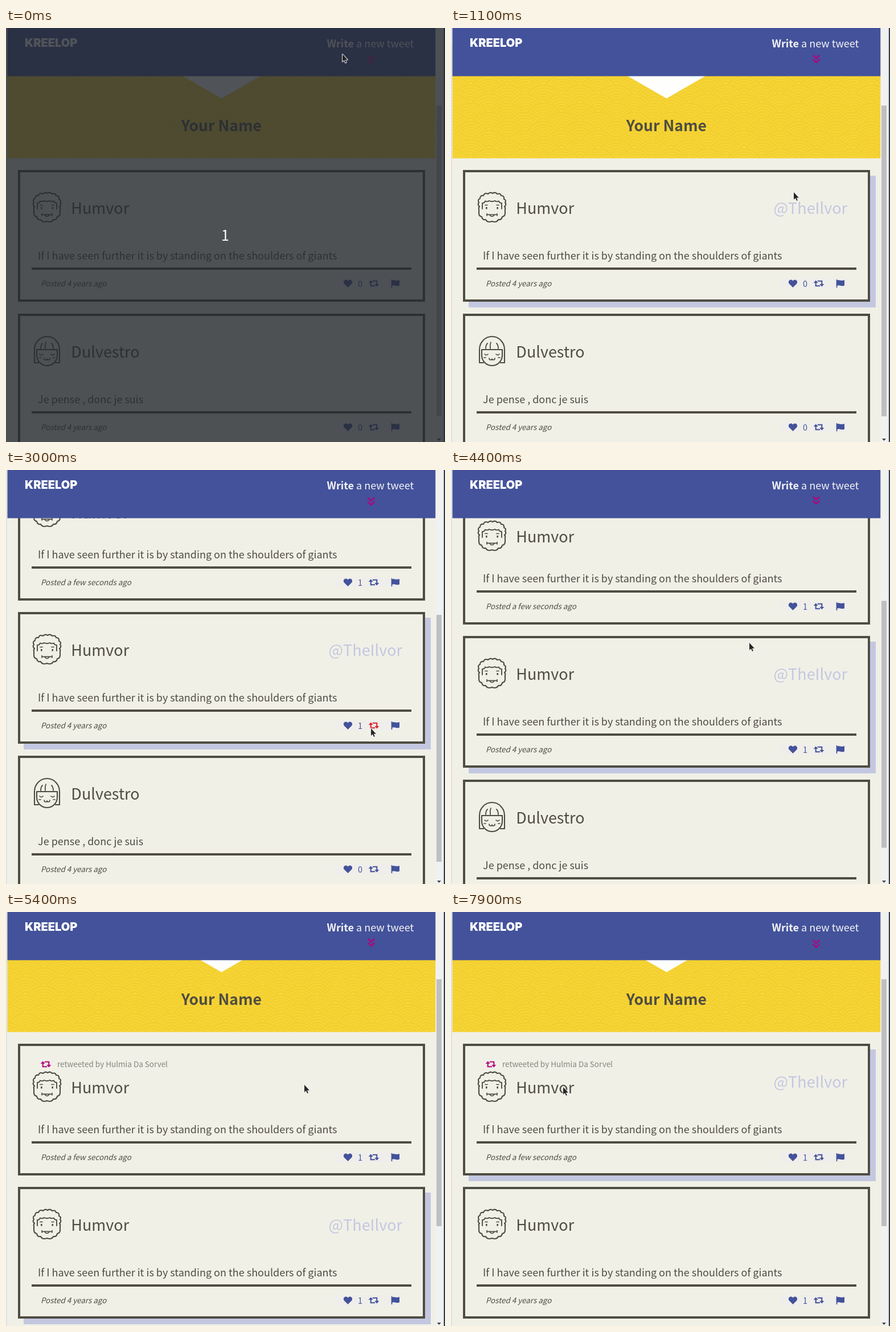
Animation of 771 by 726 pixels, one loop 8 s. Source, as an HTML page with a canvas:

```html
<!DOCTYPE html>
<html lang="en">
<head>
<meta charset="utf-8">
<style>
html, body { margin: 0; width: 771px; height: 726px; overflow: hidden; background: #f1f0e7; }
canvas { display: block; }
</style>
</head>
<body>
<canvas id="stage" width="771" height="726"></canvas>
<script>
const ctx = document.getElementById('stage').getContext('2d');
const LOOP = 8000, STEP = 100;
const INK = '#4f4d42', BLUE = '#43529a', PAPER = '#f1f0e7', LILAC = '#c3c7e0', PINK = '#b1087f';
const SANS = '"Noto Sans CJK JP", "Noto Sans CJK SC", "Noto Sans CJK", "Noto Sans", sans-serif';
const QUOTE = 'If I have seen further it is by standing on the shoulders of giants';

// Keyframes: [time, values...]
const POINTER = [
  [0, 591, 46], [200, 591, 47], [500, 587, 180], [900, 587, 272], [1100, 602, 288],
  [1500, 622, 350], [1800, 635, 408], [1900, 639, 444], [2300, 641, 453], [3300, 641, 453],
  [3700, 590, 385], [4200, 524, 303], [5400, 524, 303], [5800, 440, 287], [6300, 330, 275],
  [6900, 215, 268], [7200, 188, 280], [7500, 177, 293], [7900, 197, 307]
];
const SCROLL = [[4300, 0], [4400, 42], [4500, 92], [4800, 181], [5000, 218], [5200, 233]];

function track(keys, t) {
  if (t <= keys[0][0]) return keys[0].slice(1);
  for (let i = 1; i < keys.length; i++) {
    const a = keys[i - 1], b = keys[i];
    if (t <= b[0]) {
      const k = (t - a[0]) / (b[0] - a[0]);
      return a.slice(1).map((v, j) => v + (b[j + 1] - v) * k);
    }
  }
  return keys[keys.length - 1].slice(1);
}

function box(x, y, w, h, color) {
  ctx.fillStyle = color;
  ctx.fillRect(x, y, w, h);
}

function text(str, x, y, size, color, style = '', align = 'left') {
  ctx.font = `${style} ${size}px ${SANS}`;
  ctx.fillStyle = color;
  ctx.textAlign = align;
  ctx.fillText(str, x, y);
  return ctx.measureText(str).width;
}

function at(x, y, draw) {
  ctx.save();
  ctx.translate(x, y);
  draw();
  ctx.restore();
}

const fill = (d, color) => { ctx.fillStyle = color; ctx.fill(new Path2D(d)); };
function line(d, color, width) {
  ctx.strokeStyle = color;
  ctx.lineWidth = width;
  ctx.stroke(new Path2D(d));
}

// Overlapping fans of concentric arcs
function makeWaves() {
  const tile = document.createElement('canvas');
  const w = tile.width = 64, h = tile.height = 32;
  const g = tile.getContext('2d');
  for (let row = -1; row < 6; row++) {
    for (let col = -1; col < 3; col++) {
      const x = col * w + (row & 1 ? w / 2 : 0), y = row * h / 2 + 16;
      for (let r = 32; r > 3; r -= 5) {
        g.beginPath();
        g.arc(x, y, r, 0, Math.PI * 2);
        g.fillStyle = '#f7d535';
        g.fill();
        g.strokeStyle = '#efcc30';
        g.lineWidth = 1.3;
        g.stroke();
      }
    }
  }
  return ctx.createPattern(tile, 'repeat');
}
const waves = makeWaves();

function curlyFace() {
  line('M4 25 Q0 22 3 18 Q0 13 5 11 Q5 5 11 6 Q13 0 19 3 Q23 -1 27 2 Q32 -1 35 3 Q41 1 42 6 Q48 6 47 12 Q52 14 49 18 Q52 22 48 25', INK, 2.1);
  line('M4 25 Q2 27 3 30 V37 Q3 42 8 43 Q9 49 15 48 Q18 54 26 51 Q34 54 37 48 Q43 49 44 43 Q49 42 49 37 V30 Q50 27 48 25', INK, 2.1);
  line('M9 29 V19 Q13 19 14 15.5 Q18 17.5 21 15 Q26 17.5 31 15 Q34 17.5 38 15.5 Q39 19 43 19 V29', INK, 1.9);
  line('M14 22.5 H18 M34 22.5 H38 M17 37.5 V41 M35 37.5 V41 M17 39.3 H35 M22 40 Q26 45 30 40', INK, 1.7);
  fill('M15 26 h2.6 v3.6 h-2.6 z M34.4 26 h2.6 v3.6 h-2.6 z', INK);
}

function bobFace() {
  line('M4 47 V24 A22 23 0 0 1 48 24 V47 H41 M4 47 H11', INK, 2.1);
  line('M8 24 V34 A18 18 0 0 0 44 34 V24 Z', INK, 2.1);
  line('M15 22 Q15 16 18 13 M23 22 Q22 16 24 11 M37 22 Q37 16 34 13', INK, 1.8);
  line('M13 32 Q16 35 19 32 M33 32 Q36 35 39 32 M12 38 H15 M37 38 H40 M21 39 Q21 42 23.5 42 Q26 42 26 40 Q26 42 28.5 42 Q31 42 31 39', INK, 1.7);
}

function repost(x, y, color) {
  at(x, y, () => {
    ctx.lineCap = 'butt';
    ctx.lineJoin = 'miter';
    line('M-5.3 -2 V4.3 H2.2 M-2.2 -4.3 H5.3 V2', color, 2.1);
    fill('M-9.3 -1 L-5.3 -5.6 L-1.3 -1 Z M9.3 1 L5.3 5.6 L1.3 1 Z', color);
  });
}

function actions(y, likes, hot) {
  box(577, y - 9, 118, 18, '#efeeea');
  at(600.5, y, () => fill('M0 7 L-6.6 .4 C-10 -4 -4 -9.5 0 -4.5 C4 -9.5 10 -4 6.6 .4 Z', BLUE));
  text(likes, 618, y + 5.6, 14.4, BLUE);
  repost(646, y, hot ? '#dc242c' : BLUE);
  at(684, y, () => {
    fill('M-6 -5.5 C-2 -7.5 0 -3.5 7 -6 V3.5 C1 6 -1 1.8 -6 3.8 Z', BLUE);
    line('M-6.5 -6.3 V6.5', BLUE, 1.7);
  });
}

function card(y, o) {
  const top = Math.round(y);
  if (o.hover) box(31, top + 10, 715, 231, LILAC);
  box(21, top, 715, 231, INK);
  box(25, top + 4, 707, 223, PAPER);
  const drop = o.shared ? 10 : 0;
  if (o.shared) {
    repost(70, top + 36, PINK);
    text('retweeted by Hulmia Da Sorvel', 90, top + 41, 13.5, '#85847e');
  }
  at(46, top + 39 + drop, o.face);
  text(o.name, 114.3, top + 77 + drop, 27, INK);
  if (o.hover) text('@TheIlvor', 696, top + 77, 27, LILAC, '', 'right');
  text(o.quote, 56, top + 156.5, 18, INK);
  box(45, top + 171, 667, 4, INK);
  text(o.when, 61, top + 203.7, 13.4, INK, 'italic');
  actions(top + 199, o.likes, o.hot);
}

function banner(y) {
  const top = Math.round(y), end = top - 20.5;
  if (end < 85) return;
  at(2.5, end, () => box(0, -200, 752, 200, waves));
  at(378.5, top - 125.5, () => fill('M0 0 L-139 -80 H139 Z', '#fefefc'));
  text('Your Name', 378.3, top - 68, 26.5, INK, 'bold', 'center');
}

function header(t) {
  box(2.5, 0, 752, 84.5, BLUE);
  ctx.font = '900 20px Inter, Roboto, sans-serif';
  ctx.textAlign = 'left';
  ctx.fillStyle = '#fff';
  ctx.fillText('KREELOP', 33, 32.5);
  const w = text('Write', 563.5, 33.5, 18, '#f4f4f6', 'bold');
  text(' a new tweet', 563.5 + w, 33.5, 18, '#f4f4f6');
  const bob = -1.3 * Math.sin(2 * Math.PI * (t / 1000 - 0.08));
  at(641.5, 54.8 + bob, () => line('M-5 -6 L0 -1.3 L5 -6 M-5 1 L0 5.7 L5 1', '#a80b80', 2.8));
}

function edges(y, h) {
  box(0, 0, 2, 726, '#dde2e6');
  box(754.5, 0, 12.5, 726, '#f1f1f0');
  box(767, 0, 2, 726, '#e3e7ea');
  box(769, 0, 2, 726, '#2b3a48');
  box(756, y, 9, h, '#bfbfbf');
  at(760.5, 720, () => fill('M-3.5 0 H3.5 L0 4 Z', '#444'));
}

function pointer(x, y) {
  at(x - 0.5, y - 0.5, () => {
    const d = 'M.5 .5 V13.5 L3.4 10.8 L5.6 15.6 L7.4 14.8 L5.3 10.2 H9.4 Z';
    line(d, '#f4f4f4', 1.8);
    fill(d, '#262626');
  });
}

function draw(t) {
  const shared = t >= 2900;
  const [scroll] = track(SCROLL, t);
  const [px, py] = track(POINTER, t);
  const base = 249 + scroll;
  const first = shared ? base - 251.5 : base;
  const hot = px > 632 && px < 656 && py > 438 && py < 458;
  const likes = shared ? '1' : '0';
  const sage = { name: 'Humvor', face: curlyFace, quote: QUOTE };

  box(0, 0, 771, 726, PAPER);
  banner(first);
  if (shared) card(first, { ...sage, shared, likes, when: 'Posted a few seconds ago', hover: t >= 5500 });
  card(base, { ...sage, likes, hot, when: 'Posted 4 years ago', hover: t >= 700 && t < 5500 });
  card(base + 251.5, { name: 'Dulvestro', face: bobFace, quote: 'Je pense , donc je suis', likes: '0', when: 'Posted 4 years ago' });
  header(t);
  edges(shared ? 254 - scroll * 0.584 : 136, shared ? 433 : 545);

  if (t < 100) {
    box(0, 0, 771, 726, 'rgba(37,42,48,.8)');
    text('1', 385, 373, 25, '#fff', '', 'center');
  }
  pointer(px, py);
}

function tick(now) {
  const t = now % LOOP;
  draw(Math.floor(t / STEP) * STEP);
  requestAnimationFrame(tick);
}
ctx.lineCap = ctx.lineJoin = 'round';
draw(0);
requestAnimationFrame(tick);
</script>
</body>
</html>
```
